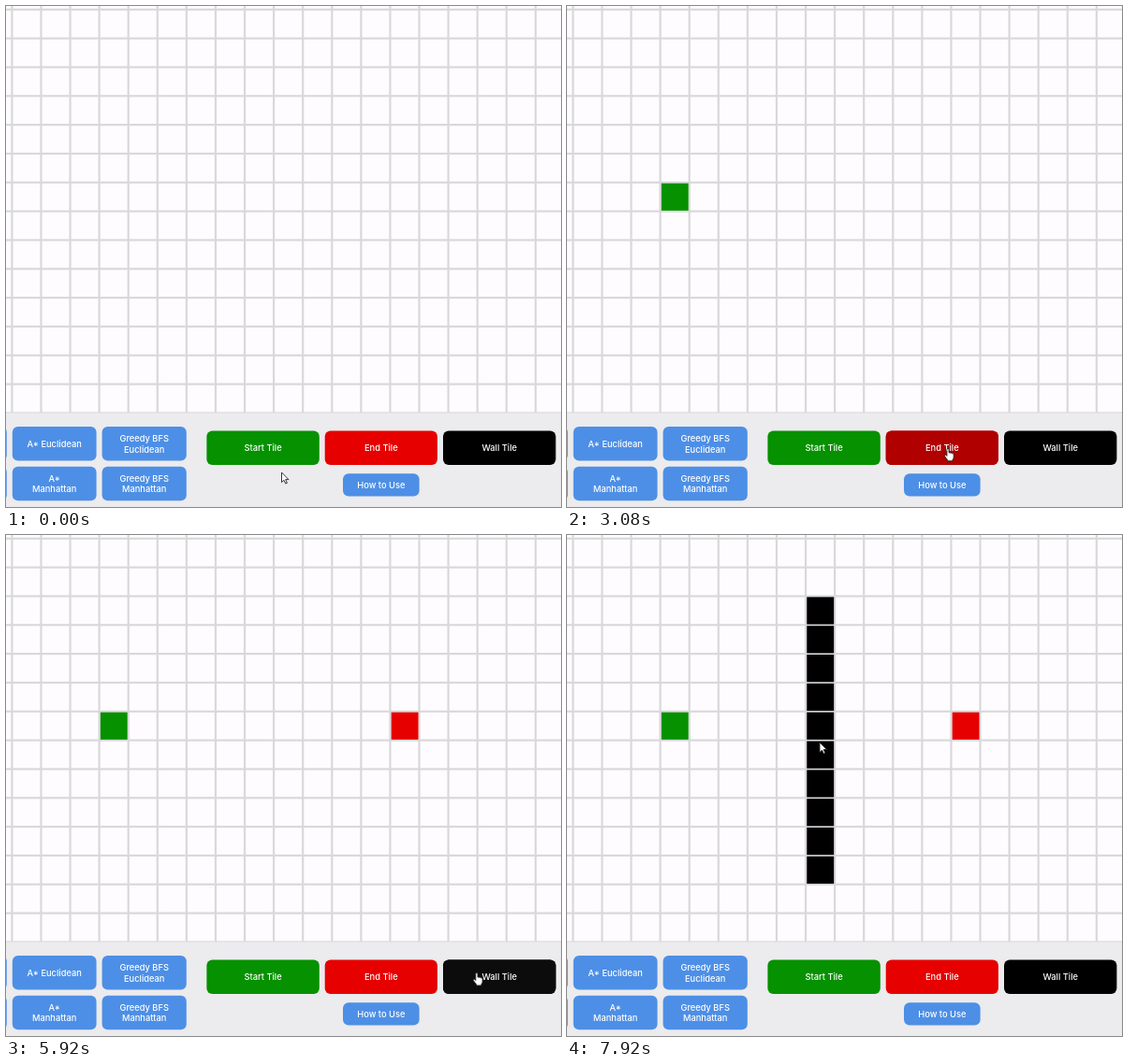
An HTML page with a canvas for the animation above (8000 ms loop, 593x536 px).

```html
<!DOCTYPE html>
<html lang="en">
<head>
<meta charset="utf-8">
<title>Pathfinding grid</title>
<style>
html, body { margin: 0; width: 100%; height: 100%; overflow: hidden; background: #fefcff; }
canvas { display: block; width: 593px; height: 536px; }
</style>
</head>
<body>
<canvas id="stage" width="593" height="536"></canvas>
<script>
const ctx = document.getElementById("stage").getContext("2d");
const LOOP = 8000, FRAMES = 96, STEP = LOOP / FRAMES;
const GREEN = "#069100", RED = "#e60000", BLUE = "#4d8fe6";
const colX = c => 6.4 + 31.08 * c;
const rowY = r => 3.8 + 30.83 * r;
const clamp = v => Math.max(0, Math.min(1, v));

// Pointer tip: time, x, y
const path = [
  [0, 294.5, 499], [250, 288, 482], [500, 285, 476], [650, 280, 470],
  [830, 240, 348], [1080, 135, 242], [1250, 116, 208], [1400, 116, 208],
  [1750, 250, 380], [2080, 357, 469], [2400, 398, 474], [2580, 406, 473],
  [3080, 407, 473], [3330, 407, 474], [3700, 420, 330], [3950, 426, 208],
  [4170, 426, 210], [4500, 455, 390], [4830, 489, 488], [5080, 505, 478],
  [5830, 508, 476], [6000, 492, 456], [6350, 380, 415], [6670, 267, 364],
  [6750, 265, 355], [6833, 264, 318], [7330, 268, 84], [7420, 269, 76],
  [7500, 269, 78], [7917, 270, 222], [8000, 270, 240]
];

function slope(i, axis) {
  const a = path[i - 1], b = path[i], c = path[i + 1];
  if (!a || !c) return 0;
  const before = (b[axis] - a[axis]) / (b[0] - a[0]);
  const after = (c[axis] - b[axis]) / (c[0] - b[0]);
  return before * after <= 0 ? 0 : 2 * before * after / (before + after);
}

function pointer(t) {
  let i = 0;
  while (i < path.length - 2 && path[i + 1][0] <= t) i++;
  const a = path[i], b = path[i + 1], span = b[0] - a[0];
  const u = clamp((t - a[0]) / span), v = 1 - u;
  return [1, 2].map(k =>
    a[k] * (1 + 2 * u) * v * v + b[k] * u * u * (3 - 2 * u) +
    span * u * v * (slope(i, k) * v - slope(i + 1, k) * u));
}

// CSS "ease" curve
function ease(x) {
  if (x <= 0) return 0;
  if (x >= 1) return 1;
  let lo = 0, hi = 1;
  for (let i = 0; i < 20; i++) {
    const s = (lo + hi) / 2;
    if (0.75 * s * (1 - s) + s * s * s < x) lo = s; else hi = s;
  }
  return 0.3 * lo * (1 - lo) ** 2 + 3 * lo * lo * (1 - lo) + lo ** 3;
}

const buttons = [
  { x: -60, y: 450, w: 60.8, h: 36.6, fill: BLUE, lines: [] },
  { x: -60, y: 492.7, w: 60.8, h: 36.6, fill: BLUE, lines: [] },
  { x: 6.8, y: 450, w: 89.8, h: 36.6, fill: BLUE, lines: ["A* Euclidean"] },
  { x: 102.6, y: 450, w: 90.2, h: 36.6, fill: BLUE, lines: ["Greedy BFS", "Euclidean"] },
  { x: 6.8, y: 492.7, w: 89.8, h: 36.6, fill: BLUE, lines: ["A*", "Manhattan"] },
  { x: 102.6, y: 492.7, w: 90.2, h: 36.6, fill: BLUE, lines: ["Greedy BFS", "Manhattan"] },
  { x: 360, y: 500.2, w: 81.6, h: 24.2, fill: BLUE, lines: ["How to Use"] },
  { x: 214.4, y: 454.6, w: 120.4, h: 36.4, fill: GREEN, hover: "#006e00", lines: ["Start Tile"] },
  { x: 340.7, y: 454.6, w: 120.2, h: 36.4, fill: RED, hover: "#b00000", lines: ["End Tile"] },
  { x: 467, y: 454.6, w: 120.4, h: 36.4, fill: "#000", hover: "#0c0c0c", lines: ["Wall Tile"] }
];
const inside = (b, [x, y]) => x > b.x && x < b.x + b.w && y > b.y && y < b.y + b.h;

// Hover strength of each button at each step
for (const b of buttons) {
  b.levels = [0];
  for (let k = 1; k < FRAMES; k++) {
    const dir = inside(b, pointer((k - 1) * STEP)) ? 1 : -1;
    b.levels[k] = clamp(b.levels[k - 1] + dir * STEP / 250);
  }
}

// Tiles with the time at which each is painted
const tiles = [
  { c: 3, r: 6, fill: GREEN, at: 1290 },
  { c: 13, r: 6, fill: RED, at: 4000 }
];
for (let t = 6740, r = 11; r >= 2; r--) {
  while (pointer(t)[1] > rowY(r + 1)) t += 2;
  tiles.push({ c: 8, r, fill: "#000", at: t });
}

function drawGrid(t) {
  ctx.fillStyle = "#fefcff";
  ctx.fillRect(0, 0, 593, 536);
  ctx.fillStyle = "#d9d8da";
  for (let c = 0; c < 19; c++) ctx.fillRect(colX(c) - 1.1, 0, 2.2, 436);
  for (let r = 0; r < 14; r++) ctx.fillRect(0, rowY(r) - 1.1, 593, 2.2);
  for (const { c, r, fill, at } of tiles) {
    ctx.globalAlpha = ease((t - at) / 500);
    ctx.fillStyle = fill;
    ctx.fillRect(colX(c) + 1.2, rowY(r) + 0.9, 28.9, 29.2);
  }
  ctx.globalAlpha = 1;
}

function drawButton(b, k) {
  const box = fill => {
    ctx.fillStyle = fill;
    ctx.beginPath();
    ctx.roundRect(b.x, b.y, b.w, b.h, 6);
    ctx.fill();
  };
  box(b.fill);
  if (b.hover && b.levels[k] > 0) {
    ctx.globalAlpha = b.levels[k];
    box(b.hover);
    ctx.globalAlpha = 1;
  }
  ctx.fillStyle = "#fff";
  b.lines.forEach((line, i) => {
    const mid = b.y + b.h / 2 + (i - (b.lines.length - 1) / 2) * 11.6;
    ctx.fillText(line, b.x + b.w / 2, mid + 3.4);
  });
}

function drawPanel(k) {
  ctx.fillStyle = "#ecebed";
  ctx.fillRect(0, 435, 593, 101);
  ctx.fillStyle = "#dddcdf";
  ctx.fillRect(0, 434.3, 593, 1.2);
  ctx.font = "500 9.3px Inter, sans-serif";
  ctx.textAlign = "center";
  for (const b of buttons) drawButton(b, k);
}

const arrow = new Path2D("M0 0V10.6L2.5 8.3L4.2 12L5.9 11.3L4.2 7.6H7.5Z");
const hand = new Path2D("M-1.1 .9Q0-.6 1.1 .9V5Q2.2 4.3 3 5.3Q4 4.7 4.7 5.7Q6.2 5.3 6.2 7V10" +
  "Q6 11.5 5 12.4V13.8H-.4V12.5Q-2 10.8-3.6 8.3Q-3.7 6.5-2.2 7.2L-1.1 8.4Z");

function drawPointer(pos) {
  const shape = buttons.some(b => inside(b, pos)) ? hand : arrow;
  ctx.save();
  ctx.translate(pos[0], pos[1]);
  ctx.fillStyle = "#fff";
  ctx.strokeStyle = "#222";
  ctx.lineWidth = 0.9;
  ctx.lineJoin = "round";
  ctx.fill(shape);
  ctx.stroke(shape);
  ctx.restore();
}

function draw() {
  const k = Math.floor((performance.now() + 5) % LOOP / STEP);
  const t = k * STEP;
  drawGrid(t);
  drawPanel(k);
  drawPointer(pointer(t));
  requestAnimationFrame(draw);
}
draw();
</script>
</body>
</html>
```
